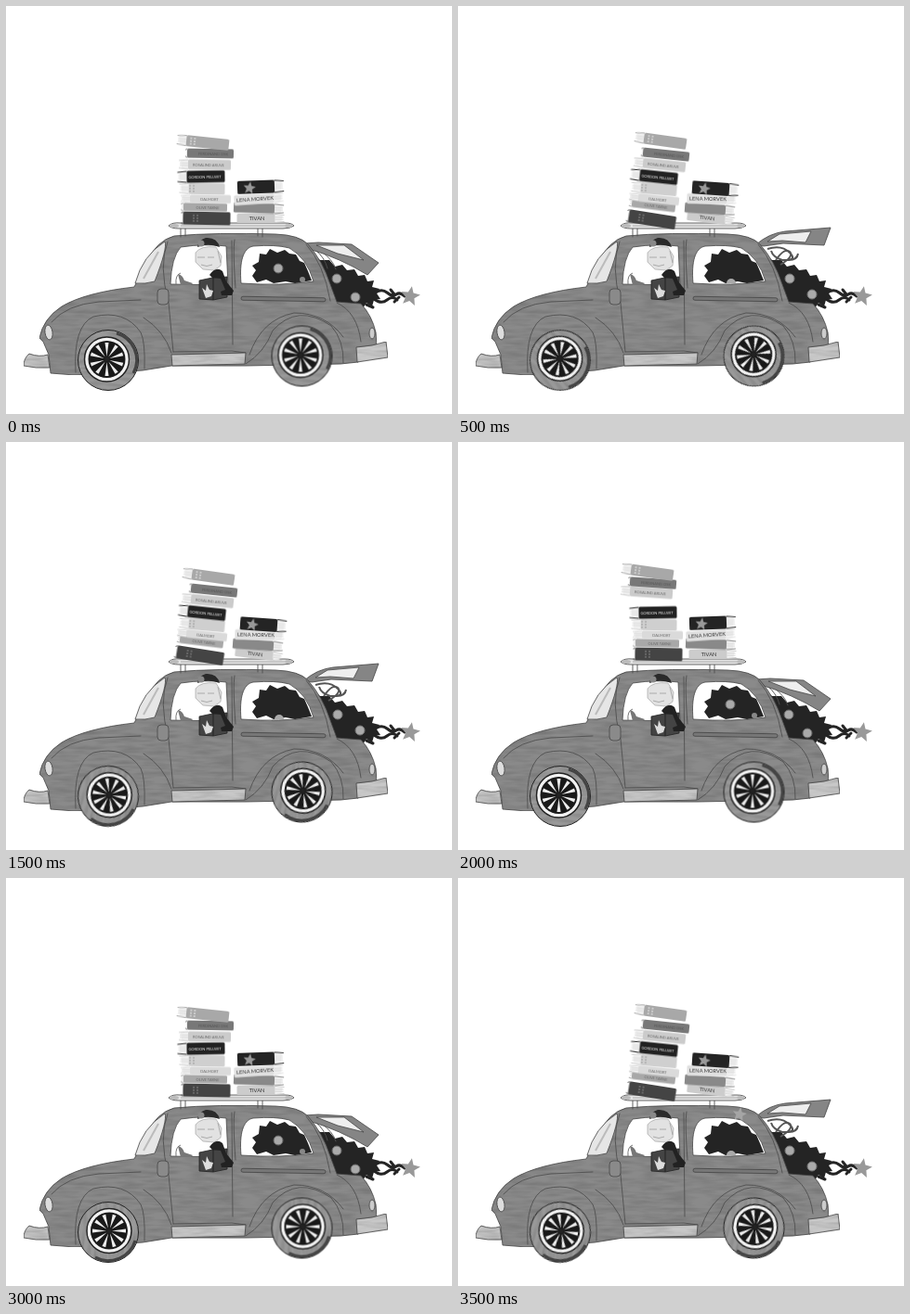
These frames come from a looping animation (480 px wide and 440 px high, 4 s). An HTML page:

```html
<!DOCTYPE html>
<html lang="en">
<head>
<meta charset="utf-8">
<title>Book car</title>
<style>
html, body { margin: 0; width: 100%; height: 100%; overflow: hidden; background: #fff; }
svg { display: block; width: 480px; height: 440px; }
text { font-family: Lato, "Open Sans", sans-serif; text-anchor: middle; }
.line { fill: none; stroke: #505050; stroke-width: .9; stroke-linecap: round; }
.edge { stroke: #444; stroke-width: .8; stroke-linejoin: round; }
.book { animation: book 4s step-end infinite; }
.spin { animation: spin 2s step-end infinite; }
.shut { animation: shut 1s step-end infinite; }
.open { animation: open 1s step-end infinite; }
.glint { animation: glint 4s step-end infinite; }
@keyframes book {
  0%, 75% { transform: var(--rest); }
  12.5%, 37.5%, 62.5%, 87.5% { transform: var(--tilt); }
  25% { transform: var(--lift); }
  50% { transform: var(--hop); }
  100% { transform: var(--rest); }
}
@keyframes spin {
  0%, 100% { transform: rotate(0deg); }
  25% { transform: rotate(45deg); }
  50% { transform: rotate(90deg); }
  75% { transform: rotate(100deg); }
}
@keyframes shut { 0%, 100% { visibility: visible; } 50% { visibility: hidden; } }
@keyframes open { 0%, 100% { visibility: hidden; } 50% { visibility: visible; } }
@keyframes glint {
  0%, 37.5%, 100% { visibility: hidden; }
  25%, 87.5% { visibility: visible; }
}
</style>
</head>
<body>
<svg viewBox="0 0 480 440">
  <defs>
    <filter id="pencil" x="0" y="0" width="100%" height="100%" color-interpolation-filters="sRGB">
      <feTurbulence type="fractalNoise" baseFrequency=".04 .25" numOctaves="2" seed="4"/>
      <feColorMatrix values="0 0 0 0 .2  0 0 0 0 .2  0 0 0 0 .2  .4 0 0 0 -.14"/>
      <feComposite in2="SourceGraphic" operator="in" result="grain"/>
      <feMerge><feMergeNode in="SourceGraphic"/><feMergeNode in="grain"/></feMerge>
    </filter>
  </defs>

  <!-- tree behind the boot -->
  <path fill="#242424" d="M322 262 338 274 348 274 354 281 362 279 367 285 375 284 379 291 386 290 389 297 396 296 394 303 402 305 399 310 403 316 396 317 394 324 388 320 384 326 378 322 366 323 354 320 342 295Z"/>
  <path fill="none" stroke="#242424" stroke-width="3" stroke-linecap="round" d="M396 310Q404 304 410 309T420 311 429 313M396 316Q404 322 410 317T421 317M414 306l4 5M418 319l5-5M388 322l7 3"/>

  <g class="shut">
    <path class="line" d="M333 263q10 8 13 20M338 264q14 9 17 20"/>
    <path class="edge" fill="#858585" d="M321 256 336 255 372 257 401 277 389 290Q360 272 326 262Z"/>
    <path class="edge" fill="#eee" d="M334 258 364 258 385 274 357 267Z"/>
    <g fill="#aaa" stroke="#666"><circle cx="356" cy="294" r="5"/><circle cx="376" cy="314" r="5"/></g>
  </g>
  <g class="open">
    <path fill="none" stroke="#555" stroke-width="2" d="M333 262q15-5 24 4t-8 8q-10-3-12-10M342 274q10-14 15-9t-10 14M356 274q9 0 10-7"/>
    <path class="edge" fill="#858585" d="M321 257Q335 245 352 243L401 239 394 258 350 256 329 259Z"/>
    <path class="edge" fill="#eee" d="M333 254 346 246 380 243 374 255 349 253Z"/>
    <g fill="#aaa" stroke="#777"><circle cx="357" cy="294" r="5"/><circle cx="381" cy="311" r="5"/></g>
  </g>
  <g id="tip"></g>

  <!-- body -->
  <path class="edge" fill="#8a8a8a" filter="url(#pencil)" d="M46 376 40 362 36 358Q40 337 60 324 85 309 138 303L151 277Q162 253 181 248 225 244 290 246 316 247 325 257 341 275 349 300L356 319 382 321Q394 334 398 352L399 366 379 384 360 386 258 388 178 388 147 393 74 398 48 396Z"/>
  <path class="line" d="M49 341Q65 322 100 319L145 317M75 395Q72 345 94 335 128 327 145 352 150 362 149 391M178 374Q170 350 148 336M258 386Q278 374 287 350 314 320 350 345 364 361 363 385M262 376Q275 338 310 331 344 331 363 357M356 320Q378 330 382 362M174 254Q164 280 175 320L180 373M243 253 244 365M180 373 243 372 258 374M246 252Q244 264 247 304M323 257Q342 278 349 318"/>
  <ellipse class="edge" fill="#ddd" cx="46" cy="352" rx="4" ry="8" transform="rotate(-8 46 352)"/>
  <ellipse class="edge" fill="#ccc" cx="394" cy="353" rx="3" ry="6"/>
  <g class="edge" fill="#c8c8c8" filter="url(#pencil)">
    <path d="M25 375Q36 379 45 376L47 390Q32 391 19 388 19 380 25 375Z"/>
    <path d="M377 368Q395 367 409 362L411 379 378 384Z"/>
    <path d="M178 376 258 374 257 386 179 388Z"/>
  </g>
  <path class="edge" fill="#e6e6e6" d="M139 299Q147 269 171 254 174 261 160 297Q150 300 139 299Z"/>
  <path fill="none" stroke="#bbb" stroke-width="2" d="M148 294 164 265"/>
  <path class="edge" fill="#fff" d="M177 300Q178 271 188 260 215 256 237 259L239 301Z"/>
  <path class="edge" fill="#fff" d="M253 299C251 276 255 261 266 259Q290 257 305 261 324 272 331 297 295 302 253 299Z"/>
  <rect class="edge" fill="#8a8a8a" x="163" y="305" width="12" height="17" rx="4"/>
  <rect class="edge" fill="#777" x="253" y="314" width="91" height="4" rx="2" transform="rotate(1 298 316)"/>

  <!-- tree through the window -->
  <path fill="#242424" d="M265 291 269 285 265 280 272 276 273 267 280 268 284 262 292 266 300 263 305 267 312 268 316 275 321 277 325 286 329 296 311 299 301 297 288 299 280 295 270 298Z"/>
  <circle class="shut" cx="293" cy="283" r="5" fill="#aaa" stroke="#666"/>
  <circle class="shut" cx="319" cy="295" r="3" fill="#888"/>
  <path class="open" fill="#aaa" d="M289 299a5 5 0 0 1 10 0Z"/>

  <!-- driver -->
  <path fill="none" stroke="#777" d="M183 300q-1-10 5-12"/>
  <path fill="#777" d="M185 289q5 1 7 7l9 3-2 2h-11Z"/>
  <path fill="#e2e2e2" stroke="#999" stroke-width=".6" d="M204 266Q210 258 226 260L232 270 231 280 224 285 212 284 204 276Z"/>
  <path fill="none" stroke="#aaa" d="M206 271h8m3 0h7M210 279q6 3 12 0m6-15 3 13"/>
  <path fill="#2a2a2a" d="M206 260Q207 252 215 250 227 249 230 260 217 255 206 260Z"/>
  <circle cx="210" cy="256" r="3.5" fill="#888"/>
  <path fill="#444" stroke="#222" stroke-width=".8" d="M208 296 222 293 238 292 238 314 223 317 208 316Z"/>
  <path stroke="#222" d="M223 293v24"/>
  <path fill="#222" d="M219 290Q226 280 233 286L237 297 245 307 243 312 232 312 231 308 236 306 231 294 222 293Z"/>
  <path fill="#ddd" d="M211 304l4 3 1-7 3 6 4 1-2 6-6 2Z"/>

  <!-- rack -->
  <path class="line" d="M188 239v10m5-10v9M271 239v9m5-8v9"/>
  <path class="edge" fill="#e4e4e4" d="M175 237Q179 233 188 234H300Q308 234 310 237 306 240 298 240H186Q178 240 175 237Z"/>
  <path stroke="#aaa" d="M188 237h112"/>
  <ellipse cx="181" cy="237" rx="5" ry="2" fill="#bbb"/>
  <ellipse cx="304" cy="237" rx="4" ry="2" fill="#bbb"/>
  <g id="glint" class="glint"></g>
  <g id="books"></g>
  <g id="wheels"></g>
</svg>
<script>
const $ = id => document.getElementById(id);

function star(r, fill, x = 0, y = 0) {
  const pts = Array.from({ length: 10 }, (_, i) => {
    const a = i * Math.PI / 5 - 1.4, d = i % 2 ? r * .45 : r;
    return (x + d * Math.cos(a)).toFixed(1) + "," + (y + d * Math.sin(a)).toFixed(1);
  });
  return `<polygon points="${pts.join(" ")}" fill="${fill}"/>`;
}

const pose = ([x, y, a]) => `translate(${x}px,${y}px) rotate(${a}deg)`;

// side: -1 puts the pages on the left, 1 on the right
function book({ w, h, fill, ink = "#666", label = "", side = -1, page = 10, deco = "", rest, tilt, hop = rest, lift = rest }) {
  const t = -h / 2, e = side * w / 2, p = e - side * page;
  const lines = [.35, .5, .65].map(k => `M${e - side} ${t + h * k}L${p} ${t + h * k}`).join("");
  const vars = Object.entries({ rest, tilt, hop, lift }).map(([k, v]) => `--${k}:${pose(v)}`).join(";");
  return `<g class="book" style="${vars}">
    <path d="M${p} ${t + .5}L${e - side * 2} ${t + 1.5} ${e - side * 3} ${-t - 1.5} ${p} ${-t - .5}Z" fill="#f2f2f2"/>
    <path d="${lines}" stroke="#d0d0d0" stroke-width=".6"/>
    <path d="M${p} ${t + .5}L${e} ${t + 1.5}M${p} ${-t - .5}L${e} ${-t - 1.5}" stroke="${fill}"/>
    <rect x="${side < 0 ? p : -w / 2}" y="${t}" width="${w - page}" height="${h}" rx="1.5" fill="${fill}"/>
    <text x="${-side * 4}" y="${side > 0 ? 2.2 : 1.6}" font-size="${side > 0 ? 5.7 : 4}" fill="${ink}">${label}</text>
    ${deco}</g>`;
}

const bands = ink => `<path d="M-13-4v8m4-8v8" stroke="${ink}" stroke-dasharray="2 1"/>`;

const stack = [
  { w: 53, h: 14, fill: "#444", page: 2, deco: bands("#888"), rest: [215, 229, 1], tilt: [208, 230, 9] },
  { w: 50, h: 9, fill: "#a8a8a8", label: "OLIVE TARNE", page: 3, rest: [213, 217, 1], tilt: [209, 215, 7] },
  { w: 54, h: 9, fill: "#dadada", label: "DALMORT", rest: [215, 208, 1], tilt: [211, 208, 6] },
  { w: 49, h: 12, fill: "#cfcfcf", deco: bands("#999"), rest: [211, 197, 1], tilt: [211, 197, 5] },
  { w: 51, h: 13, fill: "#222", ink: "#eee", label: "GORDON PELLWIT", rest: [210, 184, -1], tilt: [211, 184, 6] },
  { w: 56, h: 11, fill: "#cbcbcb", label: "ROSALIND ARUVE", rest: [214, 171, 1], tilt: [217, 171, 6], hop: [203, 162, 4] },
  { w: 52, h: 10, fill: "#787878", ink: "#555", label: "FERDINAND OSK", page: 2, rest: [219, 159, 1], tilt: [223, 160, 6], hop: [209, 152, 4] },
  { w: 56, h: 12, fill: "#a8a8a8", deco: bands("#eee"), rest: [212, 147, 6], tilt: [218, 145, 8], hop: [204, 140, 8] }
];

const pile = [
  { w: 51, h: 10, fill: "#ccc", ink: "#333", label: "TIVAN", rest: [274, 229, 0], tilt: [272, 229, 7], lift: [273, 229, 5] },
  { w: 54, h: 11, fill: "#898989", rest: [272, 218, 2], tilt: [271, 219, 4], lift: [271, 218, 2] },
  { w: 53, h: 11, fill: "#e0e0e0", ink: "#333", label: "LENA MORVEK", rest: [272, 208, -4], tilt: [273, 208, 1], lift: [272, 209, 0] },
  { w: 50, h: 14, fill: "#242424", deco: star(7, "#999", -12, 1), rest: [274, 195, -2], tilt: [277, 197, 4], lift: [274, 185, 9] }
];

$("books").innerHTML = [...stack, ...pile.map(b => ({ ...b, side: 1 }))].map(book).join("");

function wheel(x, y) {
  const spokes = Array.from({ length: 10 }, (_, i) =>
    `<path d="M0-3 -2-18h4Z" fill="#eee" transform="rotate(${i * 36})"/>`).join("");
  return `<g transform="translate(${x} ${y})"><g class="spin">
    <circle r="32.5" fill="#999" stroke="#222" filter="url(#pencil)"/>
    <path d="M9-29A30 30 0 0 1 27 14" fill="none" stroke="#444" stroke-width="3"/>
    <g transform="translate(-1.5 -1)">
      <circle r="24" fill="#f2f2f2" stroke="#222" stroke-width="1.5"/>
      <circle r="20" fill="#191919"/>${spokes}
      <circle r="2.5" fill="#222"/>
    </g></g></g>`;
}

$("wheels").innerHTML = wheel(110, 382) + wheel(318.5, 377.5);
$("tip").innerHTML = star(11, "#999", 435, 313);
$("glint").innerHTML = star(8, "#a5a5a5", 303, 255);
</script>
</body>
</html>
```
